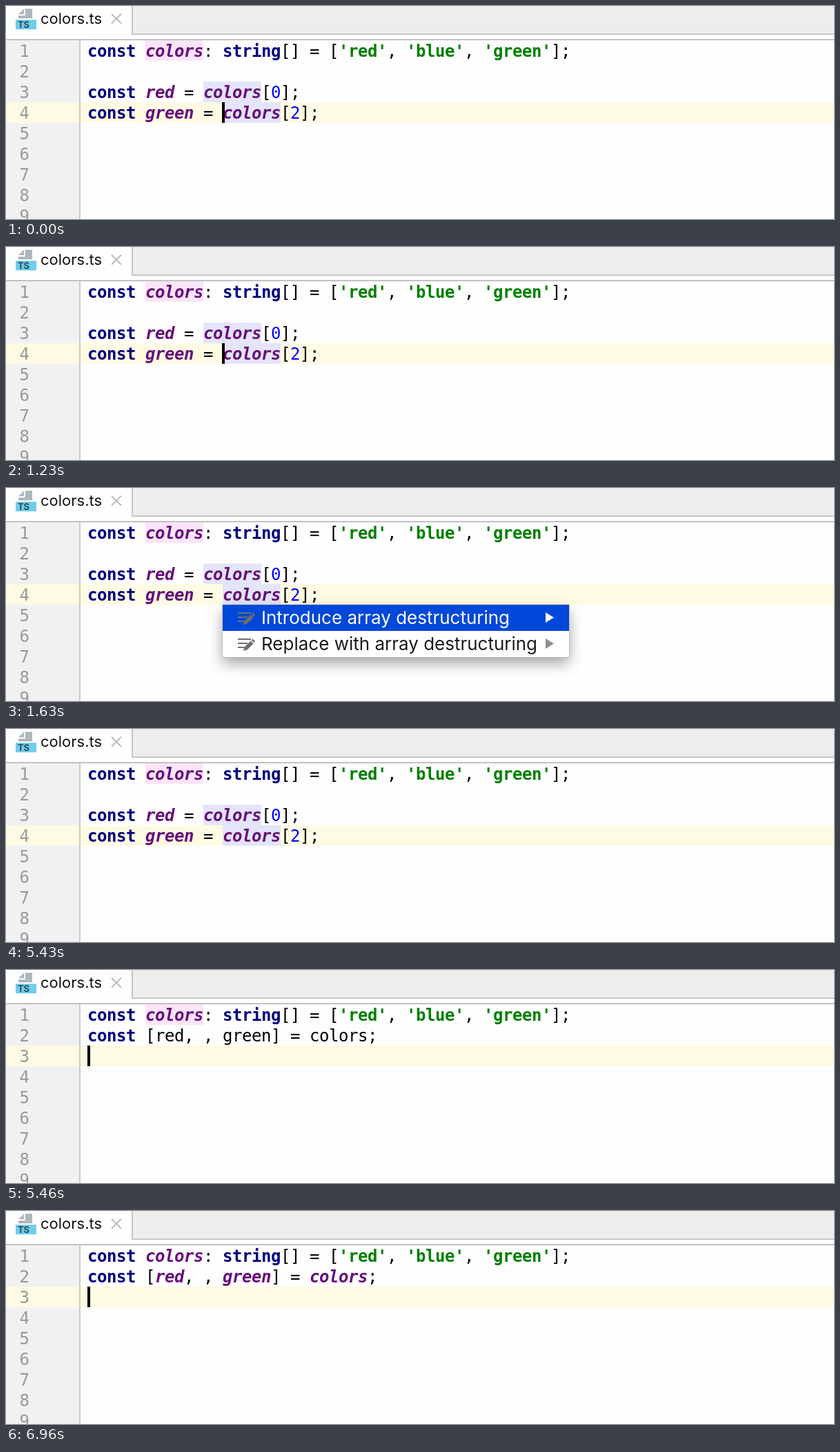
Animation, 1200 px wide and 310 px high, one loop 7400 ms. Source, as an HTML page:

```html
<!DOCTYPE html>
<html lang="en">
<head>
<meta charset="utf-8">
<title>Array destructuring</title>
<style>
  html, body { margin: 0; width: 100%; height: 100%; overflow: hidden; background: #fefefe; }
  svg { display: block; width: 1200px; height: 310px; }
  text { white-space: pre; }
  .code text { font: 24px "DejaVu Sans Mono", monospace; letter-spacing: -0.45px; fill: #000; }
  .code .key { font-weight: bold; fill: #000080; }
  .code .id { font-weight: bold; font-style: italic; fill: #660e7a; }
  .code .str { font-weight: bold; fill: #008000; }
  .code .num { fill: #0000ff; }
  .code .line { fill: #999; }
  .ui { font-family: Inter, sans-serif; }
</style>
</head>
<body>
<svg viewBox="0 0 1200 310">
  <defs>
    <filter id="shadow" x="-20%" y="-60%" width="140%" height="240%">
      <feDropShadow dx="0" dy="9" stdDeviation="10" flood-color="#000" flood-opacity=".36"/>
    </filter>
    <g id="edit" fill="#6e6e6e">
      <path d="M0 11h19v2H0zM0 17h14v2H0zM0 23h9v2H0z"/>
      <path d="M8 29l1.5-5.5 9-9 4 4-9 9zM19.5 13.5l2-2 3.500 3.500-2 2z"/>
    </g>
  </defs>

  <rect width="1200" height="310" fill="#fefefe"/>
  <rect y="50" width="106" height="260" fill="#f1f1f4"/>
  <rect id="row" width="1200" height="30" fill="#fffae3"/>
  <rect x="106" y="50" width="2" height="260" fill="#cacaca"/>

  <rect x="183" width="1017" height="41" fill="#ededec"/>
  <path d="M183 0V41H1200" fill="none" stroke="#c6c6c6" stroke-width="2"/>
  <rect y="48" width="1200" height="2" fill="#c2c2c2"/>
  <path d="M26 4L18 12H26zM28 4H38V18H18V14H28z" fill="#adb7be"/>
  <rect x="14" y="20" width="30" height="14" fill="#70cdea"/>
  <g class="ui">
    <text x="17" y="32" font-size="13" font-weight="700" fill="#294b58">TS</text>
    <text x="50" y="26" font-size="22" fill="#111">colors.ts</text>
  </g>
  <path d="M153 11.500l14 14M167 11.500l-14 14" stroke="#b9b9b9" stroke-width="1.800"/>

  <g class="code" id="numbers"></g>
  <rect id="pink" x="202" y="50" width="84" height="30" fill="#fce4f9"/>
  <g id="uses" fill="#e4e4fa">
    <rect x="286" y="110" width="84" height="30"/>
    <rect x="314" y="140" width="84" height="30"/>
  </g>
  <g class="code" id="head"></g>
  <g class="code" id="before"></g>
  <g class="code" id="plain"></g>
  <g class="code" id="after"></g>
  <rect id="caret" width="4" height="30"/>

  <g id="menu">
    <rect x="314" y="170" width="502" height="76" fill="#fff" filter="url(#shadow)"/>
    <rect x="313.500" y="169.500" width="503" height="77" fill="none" stroke="#bbb" stroke-opacity=".7"/>
    <rect id="pick" x="314" width="502" height="38" fill="#0048d9"/>
    <g class="ui" id="items" font-size="26"></g>
  </g>
</svg>
<script>
const LOOP = 7400, COL = 14, ROW = 30;
const $ = id => document.getElementById(id);

function add(parent, tag, attrs, text = '') {
  const el = document.createElementNS('http://www.w3.org/2000/svg', tag);
  for (const key in attrs) el.setAttribute(key, attrs[key]);
  el.textContent = text;
  return parent.appendChild(el);
}

// Lays out [class, text] tokens on the character grid.
function codeLine(parent, row, tokens) {
  let col = 0;
  for (const [kind, text] of tokens) {
    add(parent, 'text', { class: kind, x: 118 + col * COL, y: 44 + row * ROW }, text);
    col += text.length;
  }
}

for (let n = 1; n <= 9; n++)
  add($('numbers'), 'text', { class: 'line', x: 19.5, y: 44 + n * ROW }, n);

codeLine($('head'), 1, [
  ['key', 'const '], ['id', 'colors'], ['', ': '], ['key', 'string'], ['', '[] = ['],
  ['str', "'red'"], ['', ', '], ['str', "'blue'"], ['', ', '], ['str', "'green'"], ['', '];']
]);
[['red', 0], ['green', 2]].forEach(([name, index], i) => codeLine($('before'), 3 + i, [
  ['key', 'const '], ['id', name], ['', ' = '], ['id', 'colors'], ['', '['], ['num', `${index}`], ['', '];']
]));
for (const [group, kind] of [['plain', ''], ['after', 'id']])
  codeLine($(group), 2, [
    ['key', 'const '], ['', '['], [kind, 'red'], ['', ', , '], [kind, 'green'],
    ['', '] = '], [kind, 'colors'], ['', ';']
  ]);

const items = ['Introduce', 'Replace with'].map((verb, i) => {
  const y = 170 + i * 38;
  add($('items'), 'use', { href: '#edit', x: 336, y });
  return {
    label: add($('items'), 'text', { x: 370, y: y + 28 }, verb + ' array destructuring'),
    arrow: add($('items'), 'path', { d: `M782 ${y + 11}l12 7.500-12 7.500z` })
  };
});

// start, current row, caret, menu choice (-1 = closed), pink mark, coloured names
const steps = [
  [0, 4, true, -1, true, false],
  [730, 4, false, -1, true, false],
  [1230, 4, true, -1, true, false],
  [1630, 4, false, 0, true, false],
  [3300, 4, false, 1, true, false],
  [5430, 4, false, -1, true, false],
  [5460, 3, true, -1, true, false],
  [5730, 3, true, -1, false, false],
  [5760, 3, true, -1, false, true],
  [6460, 3, false, -1, false, true],
  [6960, 3, true, -1, false, true]
];

const show = (id, on) => { $(id).style.display = on ? '' : 'none'; };
let current;

function draw() {
  const time = performance.now() % LOOP;
  const step = steps.findLast(s => s[0] <= time);
  if (step !== current) {
    current = step;
    const [, row, caret, choice, pink, coloured] = step;
    const done = row === 3, y = 20 + row * ROW;
    $('row').setAttribute('y', y);
    $('caret').setAttribute('x', done ? 118 : 313);
    $('caret').setAttribute('y', y);
    show('caret', caret);
    show('pink', pink);
    show('uses', !done);
    show('before', !done);
    show('plain', done && !coloured);
    show('after', done && coloured);
    show('menu', choice >= 0);
    $('pick').setAttribute('y', 170 + Math.max(choice, 0) * 38);
    items.forEach(({ label, arrow }, i) => {
      label.setAttribute('fill', i === choice ? '#fff' : '#1c1c1c');
      arrow.setAttribute('fill', i === choice ? '#fff' : '#8e8e8e');
    });
  }
  requestAnimationFrame(draw);
}
draw();
</script>
</body>
</html>
```
